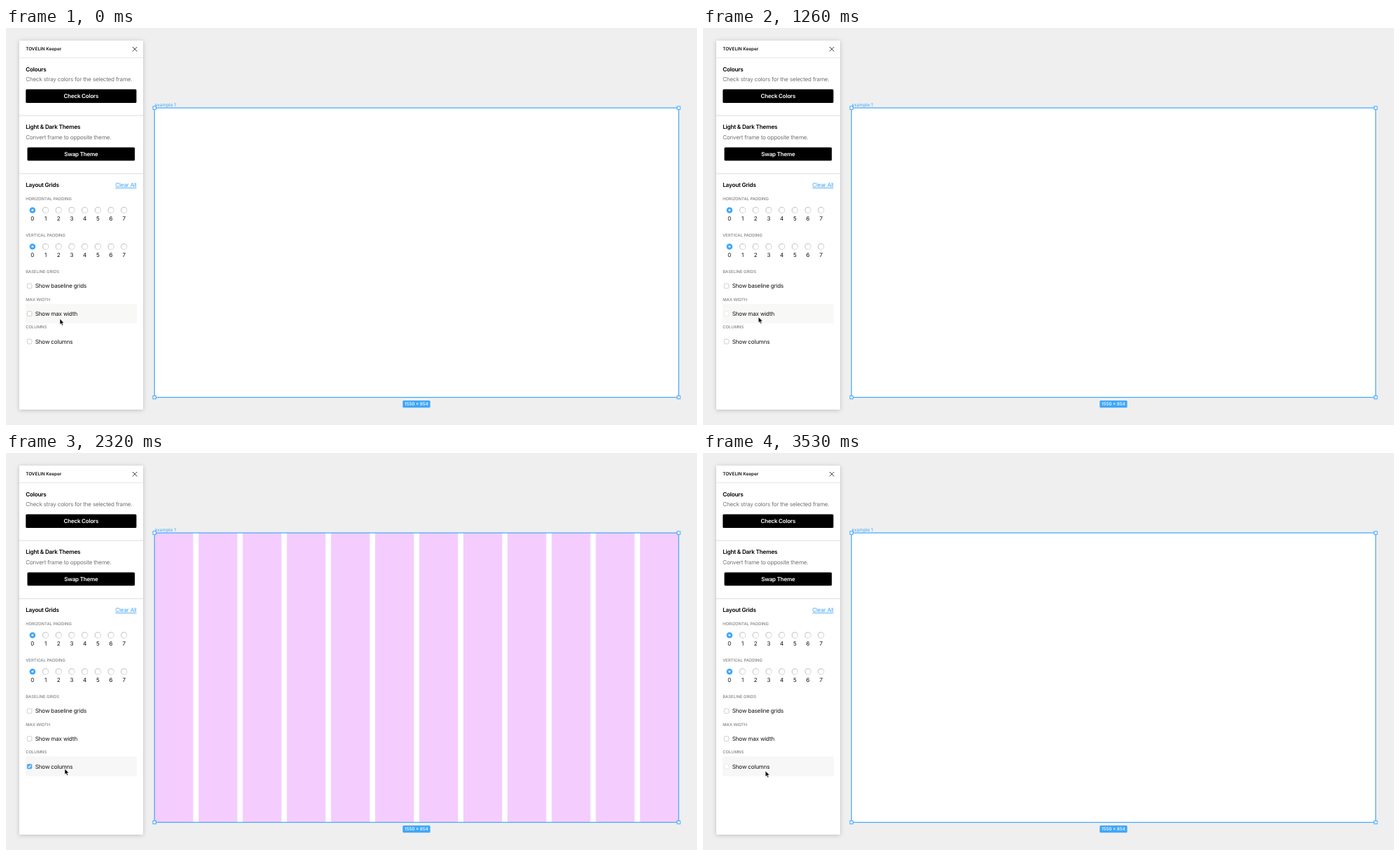
An HTML page that plays this animation: 988x567 px, repeating every 3.76 s.

```html
<!DOCTYPE html>
<html lang="en">
<head>
<meta charset="utf-8">
<title>Layout grid panel</title>
<style>
  html, body { margin: 0; width: 100%; height: 100%; overflow: hidden; background: #efefef; }
  svg { display: block; width: 100vw; height: 100vh; }
  text { font: 400 8.1px Inter, "Open Sans", sans-serif; letter-spacing: -.025em; fill: #111; text-rendering: geometricPrecision; }
  .title { font-size: 6.4px; font-weight: 600; letter-spacing: 0; }
  .heading { font-weight: 600; font-size: 8.2px; fill: #000; }
  .note { fill: #737373; }
  .button { font-weight: 600; font-size: 8px; fill: #fff; text-anchor: middle; }
  .label { font-size: 5.9px; font-weight: 500; letter-spacing: 0; fill: #808080; }
  .link { fill: #3fa2f7; text-decoration: underline; }
  .digits { text-anchor: middle; letter-spacing: 0; }
  .frame-name { font-size: 6.5px; letter-spacing: 0; fill: #3fa7fb; }
  .size { font-size: 6.3px; font-weight: 500; letter-spacing: 0; fill: #fff; text-anchor: middle; }
  .panel { fill: #fff; filter: drop-shadow(0 1px 3px rgba(0, 0, 0, .2)); }
  .box { fill: #fff; stroke: #b9b9b9; color: #fff; stroke-width: .7; }
  .tick { fill: none; stroke: currentColor; stroke-width: 1.15; }

  .grid, .hover, .max-box, .columns-box { animation: 3760ms step-end infinite; }
  .max-grid { animation-name: max-grid; }
  .columns-grid { animation-name: columns-grid; }
  .max-hover { animation-name: max-hover; }
  .columns-hover { animation-name: columns-hover; }
  .max-box { animation-name: max-box; }
  .columns-box { animation-name: columns-box; }
  .cursor { animation: cursor 3760ms linear infinite; }

  @keyframes max-grid {
    0%, 33.5% { opacity: 0; }
    6.64% { opacity: 1; }
  }
  @keyframes columns-grid {
    0%, 93.88% { opacity: 0; }
    61.7% { opacity: 1; }
  }
  @keyframes max-hover {
    0% { opacity: 1; }
    45% { opacity: 0; }
  }
  @keyframes columns-hover {
    0% { opacity: 0; }
    46.5% { opacity: 1; }
  }
  @keyframes max-box {
    0%, 35.9% { fill: #fff; stroke: #b9b9b9; color: #fff; }
    .79% { fill: #eee; stroke: #b9b9b9; color: #eee; }
    6.64% { fill: #50aaf2; stroke: #50aaf2; color: #fff; }
    21.54% { fill: #1a60ee; stroke: #1a60ee; color: #fff; }
    33.5% { fill: #fff; stroke: #d5e6f5; color: #fff; }
  }
  @keyframes columns-box {
    0% { fill: #fff; stroke: #b9b9b9; color: #fff; }
    57.44% { fill: #eee; stroke: #b9b9b9; color: #eee; }
    61.7% { fill: #50aaf2; stroke: #50aaf2; color: #fff; }
    85.37% { fill: #1a60ee; stroke: #1a60ee; color: #fff; }
    93.88% { fill: #fff; stroke: #dce6ee; color: #fff; }
  }
  @keyframes cursor {
    0%, .79% { transform: translate(77px, 415.3px); }
    6.64%, 21.54% { transform: translate(76.2px, 416.8px); }
    28.19%, 40.15% { transform: translate(79.3px, 412.8px); }
    45.2% { transform: translate(112px, 433px); }
    50.5%, 76.5% { transform: translate(84px, 451px); }
    77.39%, 89.62% { transform: translate(89.8px, 450.6px); }
    93.88%, 100% { transform: translate(89.2px, 454px); }
  }
</style>
</head>
<body>
<svg viewBox="0 0 988 567" preserveAspectRatio="none">
  <defs>
    <linearGradient id="rim" x2="1" y2="1">
      <stop offset=".2" stop-color="#a8a8a8"/>
      <stop offset="1" stop-color="#dadada"/>
    </linearGradient>
    <circle id="radio" r="4.1" fill="#fff" stroke="url(#rim)" stroke-width=".8"/>
    <g id="radios">
      <circle cx="37.9" r="4.3" fill="#3fa7fa"/>
      <circle cx="37.9" r="1.4" fill="#fff"/>
      <use href="#radio" x="56.6"/>
      <use href="#radio" x="75.3"/>
      <use href="#radio" x="94"/>
      <use href="#radio" x="112.7"/>
      <use href="#radio" x="131.4"/>
      <use href="#radio" x="150.1"/>
      <use href="#radio" x="168.8"/>
      <text class="digits" x="37.9 56.6 75.3 94 112.7 131.4 150.1 168.8" y="15">01234567</text>
    </g>
    <g id="checkbox">
      <rect x="-3.3" y="-3.3" width="6.6" height="6.6" rx="1.3"/>
      <path class="tick" d="M-1.8 .1L-.5 1.5L1.9-1.6"/>
    </g>
    <rect id="handle" x="-2.2" y="-2.2" width="4.4" height="4.4" fill="#fff" stroke="#3fa7fb"/>
    <pattern id="columns" x="212.3" y="114" width="63.1" height="414" patternUnits="userSpaceOnUse">
      <rect width="55.4" height="414" fill="#f5ccfe"/>
    </pattern>
  </defs>

  <rect width="988" height="567" fill="#efefef"/>

  <rect class="panel" x="19" y="18" width="177" height="527" rx="1"/>
  <path d="M19 42.5H196" stroke="#e8e8e8"/>
  <path d="M19 125H196M19 208H196" stroke="#dcdcdc" stroke-width="1.2"/>
  <text class="title" x="28.2" y="32.4">TOVELIN Keeper</text>
  <path d="M181 27l6.4 6.4m0-6.4l-6.4 6.4" stroke="#222" stroke-width=".9"/>

  <text class="heading" x="28.2" y="61.5">Colours</text>
  <text class="note" x="28.2" y="76">Check stray colors for the selected frame.</text>
  <rect x="28.3" y="87.5" width="158.2" height="19.5" rx="1.6"/>
  <text class="button" x="107.4" y="100.4">Check Colors</text>

  <text class="heading" x="28.2" y="144.3">Light &amp; Dark Themes</text>
  <text class="note" x="28.2" y="159">Convert frame to opposite theme.</text>
  <rect x="30.5" y="170.4" width="153.7" height="19.2" rx="1.6"/>
  <text class="button" x="107.4" y="183.2">Swap Theme</text>

  <text class="heading" x="28.2" y="227.2">Layout Grids</text>
  <text class="link" x="186.6" y="227" text-anchor="end">Clear All</text>

  <text class="label" x="28.2" y="246">HORIZONTAL PADDING</text>
  <use href="#radios" y="260.2"/>
  <text class="label" x="28.2" y="298.2">VERTICAL PADDING</text>
  <use href="#radios" y="312.2"/>

  <rect class="hover max-hover" x="28" y="394" width="159" height="28" fill="#f8f8f6"/>
  <rect class="hover columns-hover" x="28" y="433.3" width="159" height="28.2" fill="#f7f7f7"/>

  <text class="label" x="28.2" y="350.2">BASELINE GRIDS</text>
  <g class="box"><use href="#checkbox" x="33.6" y="368.5"/></g>
  <text x="41.8" y="371.3">Show baseline grids</text>
  <text class="label" x="28.2" y="389.7">MAX WIDTH</text>
  <g class="box max-box"><use href="#checkbox" x="33.6" y="408.1"/></g>
  <text x="41.8" y="411">Show max width</text>
  <text class="label" x="28.2" y="429.3">COLUMNS</text>
  <g class="box columns-box"><use href="#checkbox" x="33.6" y="447.7"/></g>
  <text x="41.8" y="450.6">Show columns</text>

  <text class="frame-name" x="212.6" y="111.8">example 1</text>
  <rect x="212.3" y="114.1" width="749.5" height="413.4" fill="#fff"/>
  <g class="grid max-grid">
    <rect x="212.3" y="114.1" width="749.5" height="413.4" fill="#feefcc"/>
    <rect x="355.7" y="114.1" width="463.3" height="413.4" fill="#cce0ff"/>
  </g>
  <rect class="grid columns-grid" x="212.3" y="114.1" width="749.5" height="413.4" fill="url(#columns)"/>
  <rect x="212.3" y="114.1" width="749.5" height="413.4" fill="none" stroke="#3fa7fb" stroke-width="1.2"/>
  <use href="#handle" x="212.3" y="114.1"/>
  <use href="#handle" x="961.8" y="114.1"/>
  <use href="#handle" x="212.3" y="527.5"/>
  <use href="#handle" x="961.8" y="527.5"/>
  <rect x="567.2" y="532" width="39.4" height="10.2" rx="1.5" fill="#3fa7fb"/>
  <text class="size" x="586.9" y="539.4">1550 × 854</text>

  <path class="cursor" d="M0 0V8.3L1.9 6.6L3.2 9.6L4.7 9L3.4 6H6Z" stroke="#fff" stroke-width=".6"/>
</svg>
</body>
</html>
```
